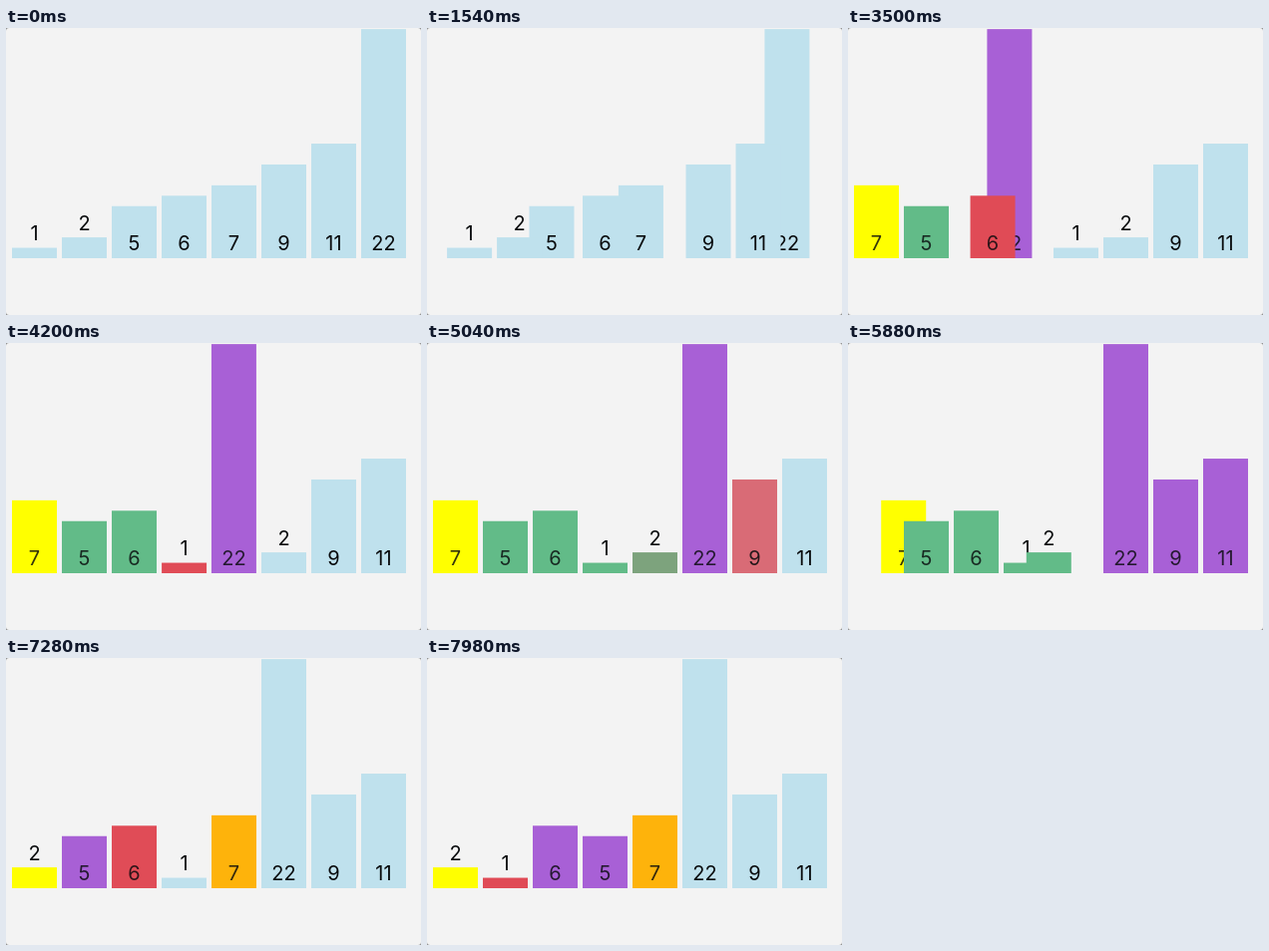
An HTML page that plays this animation: 416 by 288 pixels, repeating every 8 s.

```html
<!DOCTYPE html>
<html lang="en">
<head>
<meta charset="utf-8">
<title>Quick sort</title>
<style>
  html, body { margin: 0; width: 100%; height: 100%; overflow: hidden; background: #8a8a8a; }
  svg { display: block; width: 416px; height: 288px; background: #f3f3f3; border-radius: 3px; }
  text { font: 20px Inter, "Liberation Sans", sans-serif; text-anchor: middle; fill: #080a0c; }
</style>
</head>
<body>
<svg id="stage" viewBox="0 0 416 288"></svg>
<script>
const LOOP = 8000, TICK = 70, EASE_MS = 250;
const BASE = 231, UNIT = 10.45, WIDTH = 45, GAP = 50, LEFT = 6;

// B idle, Y pivot, R comparing, G smaller, P larger, O sorted
const COLORS = {
  B: [191, 225, 237], Y: [255, 255, 0], R: [224, 75, 86],
  G: [98, 187, 136], P: [168, 96, 214], O: [254, 179, 11]
};

// Start time, then value:slot or value:colour
const STEPS = [
  [1475, '7:0 5:1 22:2 6:3 1:4 2:5 9:6 11:7'],
  [2139, '7:Y'],
  [2444, '5:R'],
  [2749, '5:G 22:R'],
  [3054, '22:P 6:R'],
  [3359, '6:2 22:3'],
  [3664, '6:G 1:R'],
  [3969, '1:3 22:4'],
  [4274, '1:G 2:R'],
  [4579, '2:4 22:5'],
  [4884, '2:G 9:R'],
  [5189, '9:P 11:R'],
  [5494, '11:P'],
  [5799, '7:4 2:0'],
  [6104, '5:B 6:B 1:B 2:B 22:B 9:B 11:B 7:O'],
  [6448, '2:Y'],
  [6755, '5:R'],
  [7060, '5:P 6:R'],
  [7365, '6:P 1:R'],
  [7670, '1:1 5:3']
];

const stage = document.getElementById('stage');
const sorted = [1, 2, 5, 6, 7, 9, 11, 22];
const bars = {};

function add(parent, tag, attrs) {
  const el = document.createElementNS('http://www.w3.org/2000/svg', tag);
  for (const name in attrs) el.setAttribute(name, attrs[name]);
  return parent.appendChild(el);
}

for (const value of [7, 5, 22, 6, 1, 2, 9, 11]) {
  const height = value * UNIT, inside = height > 30;
  const group = add(stage, 'g', {});
  const rect = add(group, 'rect', { y: BASE - height, width: WIDTH, height });
  const label = add(group, 'text', { x: WIDTH / 2, y: inside ? 223 : BASE - height - 7.5 });
  label.textContent = value;
  bars[value] = {
    group, rect, label, inside,
    slots: [[-EASE_MS, [sorted.indexOf(value)]]],
    fills: [[-EASE_MS, COLORS.B]],
    inks: [[-EASE_MS, [1]]]
  };
}

for (const [time, changes] of STEPS) {
  for (const change of changes.split(' ')) {
    const [value, to] = change.split(':');
    const bar = bars[value];
    if (COLORS[to]) {
      bar.fills.push([time, COLORS[to]]);
      bar.inks.push([time, [to === 'B' || !bar.inside ? 1 : 0.82]]);
    } else {
      bar.slots.push([time, [+to]]);
    }
  }
}

function cubicInOut(p) {
  return p < 0.5 ? 4 * p ** 3 : 1 - 4 * (1 - p) ** 3;
}

function valueAt(track, t) {
  let i = track.length - 1;
  while (i > 0 && track[i][0] > t) i--;
  const [start, to] = track[i];
  const from = track[Math.max(0, i - 1)][1];
  const k = cubicInOut(Math.min(1, (t - start) / EASE_MS));
  return to.map((v, n) => from[n] + (v - from[n]) * k);
}

function draw(t) {
  for (const bar of Object.values(bars)) {
    const x = LEFT + GAP * valueAt(bar.slots, t)[0];
    bar.group.setAttribute('transform', `translate(${x} 0)`);
    bar.rect.setAttribute('fill', `rgb(${valueAt(bar.fills, t).map(Math.round)})`);
    bar.label.setAttribute('fill-opacity', valueAt(bar.inks, t)[0]);
  }
}

let began;
function frame(now) {
  began ??= now;
  // Small lead so a late first paint still lands on the right tick
  const t = (now - began + 12) % LOOP;
  draw(Math.floor(t / TICK) * TICK);
  requestAnimationFrame(frame);
}
draw(0);
requestAnimationFrame(frame);
</script>
</body>
</html>
```
